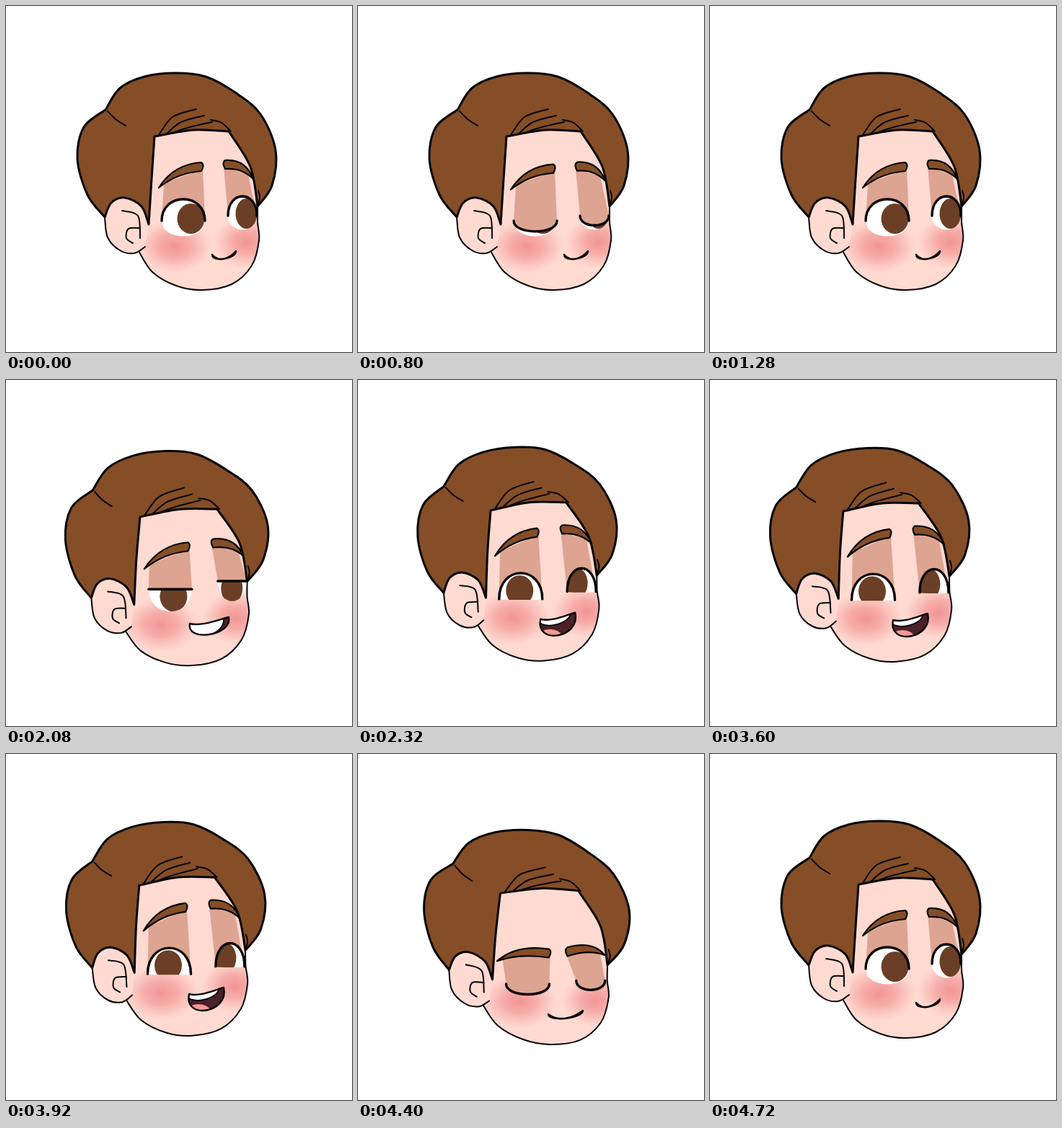
These frames come from a looping animation (480 px wide and 480 px high, 4800 ms). An HTML page with a canvas:

```html
<!DOCTYPE html>
<html lang="en">
<head>
<meta charset="utf-8">
<title>Head turn</title>
<style>
html, body { margin: 0; width: 100%; height: 100%; overflow: hidden; background: #fff; }
canvas { display: block; width: 480px; height: 480px; }
</style>
</head>
<body>
<canvas id="stage" width="480" height="480"></canvas>
<script>
const ctx = document.getElementById('stage').getContext('2d');
const LOOP = 4800, STEP = 80;
const INK = '#050404', SKIN = '#ffdad1', HAIR = '#854e27', IRIS = '#6a3f26', SHADE = '#dda491';

// One resting head; each outline is a smooth run through a few points, x and y in turn.
const HEAD = {
  lobe: [137, 293, 113, 262, 99, 212, 108, 168, 138, 144],
  crown: [138, 144, 158, 114, 192, 98, 235, 93, 277, 98, 318, 120, 353, 150, 374, 200, 369, 249, 349, 278],
  temple: [349, 278, 339, 223, 309, 174],
  fringe: [309, 174, 260, 172, 206, 181],
  sideburn: [206, 181, 202, 240, 198, 303],
  overEar: [198, 303, 188, 278, 165, 266, 146, 273, 137, 293],
  ear: [137, 293, 141, 321, 158, 339, 178, 343, 193, 334],
  jaw: [184, 340, 203, 369, 236, 388, 272, 394, 313, 386, 341, 360, 351, 325, 349, 300, 349, 278],
  cleft: [141, 146, 152, 157, 166, 166],
  lock: [284, 158, 299, 162, 312, 174],
  earFold: [161, 284, 183, 291, 186, 322],
  earCurl: [186, 308, 170, 309, 167, 322, 176, 329],
  edge: [350, 256, 352, 266, 349, 277]
};
const BROWS = [{ tip: [212, 252], end: [271, 217], side: 1 }, { tip: [343, 240], end: [304, 214], side: -1 }];
const EYES = [{ at: [246, 298], rx: 30, ry: 30, iris: 19, side: 1 }, { at: [328, 291], rx: 20, ry: 27, iris: 15, side: -1 }];

// warp: dx, dy of the four corners and of the middle bulge
// brow: dx, dy, inner drop; eye: dx, dy, lid height, lower height
// mouth: left corner, right corner, sag, opening, teeth depth
const glance = {
  warp: [0, 0, 0, 0, 0, 0, 0, 0, 0, 0], brow: [0, 0, 0],
  eye: [0, 0, 1, .72], look: [8, -3], mouth: [286, 345, 319, 340, 11, 0, 0]
};
const smirk = {
  warp: [-17, 9, -10, 2, -16, 9, -13, -2, -7, 4], brow: [1, 1, 0],
  eye: [2, -15, 0, 1.03], look: [2, 10], mouth: [255, 338, 309, 329, 4, 22, 26]
};
const laugh = {
  warp: [-17, 7, -16, -4, -13, 5, -14, -8, -7, -1], brow: [0, -6, -2],
  eye: [1, 9, 1.2, .04], look: [-4, -12], mouth: [254, 333, 302, 324, 4, 32, 14]
};
const dip = {
  warp: [-5, 7, 5, 18, -11, 2, -3, 13, -7, 3], brow: [-3, 15, 24],
  eye: [0, 9, -.48, .48], look: [3, 4], mouth: [264, 361, 312, 356, 11, 0, 0]
};

// time, pose, offset x, offset y
const KEYS = [
  [0, glance, 0, 0], [1840, glance, 0, 0], [1920, dip, 5, 5], [2080, smirk, 0, 0],
  [2160, laugh, -6, -10], [2240, laugh, -3, -5], [2400, laugh, 0, 0],
  [4240, laugh, 0, 0], [4400, dip, 0, 0], [4640, glance, 0, 0], [LOOP, glance, 0, 0]
];
const BLINKS = [[640, 1120], [3600, 3920]];

let pose, blink;
const lerp = (a, b, k) => a + (b - a) * k;
const mix = (a, b, k) => a.map((v, i) => lerp(v, b[i], k));

function setTime(t) {
  const i = KEYS.findIndex(key => key[0] > t);
  const [t0, a, ...from] = KEYS[i - 1], [t1, b, ...to] = KEYS[i];
  const k = 1 - (1 - (t - t0) / (t1 - t0)) ** 2;
  pose = { shift: mix(from, to, k) };
  for (const part in a) pose[part] = mix(a[part], b[part], k);
  blink = 0;
  for (const [on, off] of BLINKS) {
    if (t > on && t < off) blink = Math.sin(Math.PI * (t - on) / (off - on));
  }
}

function warp([x, y]) {
  const u = (x - 99) / 275, v = (y - 92) / 302, w = pose.warp;
  const bulge = 16 * u * (1 - u) * v * (1 - v);
  const move = i => lerp(lerp(w[i], w[i + 2], u), lerp(w[i + 4], w[i + 6], u), v) + w[i + 8] * bulge;
  return [x + move(0), y + move(1)];
}

// Smooth curves through the warped points, joined with corners between the runs.
function trace(...runs) {
  const path = new Path2D();
  runs.forEach((flat, r) => {
    const p = [];
    for (let i = 0; i < flat.length; i += 2) p.push(warp([flat[i], flat[i + 1]]));
    if (!r) path.moveTo(...p[0]);
    const slope = i => {
      const a = p[Math.max(i - 1, 0)], b = p[Math.min(i + 1, p.length - 1)];
      return [(b[0] - a[0]) / 6, (b[1] - a[1]) / 6];
    };
    for (let i = 1; i < p.length; i++) {
      const [ax, ay] = slope(i - 1), [bx, by] = slope(i);
      path.bezierCurveTo(p[i - 1][0] + ax, p[i - 1][1] + ay, p[i][0] - bx, p[i][1] - by, ...p[i]);
    }
  });
  return path;
}

function fill(path, color) { ctx.fillStyle = color; ctx.fill(path); }

function stroke(path, width) { ctx.lineWidth = width; ctx.strokeStyle = INK; ctx.stroke(path); }

function clipped(path, draw) {
  ctx.save();
  ctx.clip(path);
  draw();
  ctx.restore();
}

function oval(x, y, rx, ry, color) {
  const path = new Path2D();
  path.ellipse(x, y, rx, ry, 0, 0, Math.PI * 2);
  fill(path, color);
}

function blush(at, rx, ry) {
  ctx.save();
  ctx.translate(...warp(at));
  ctx.scale(rx, ry);
  const glow = ctx.createRadialGradient(0, 0, 0, 0, 0, 1);
  glow.addColorStop(0, 'rgba(234,112,118,.66)');
  glow.addColorStop(.45, 'rgba(236,120,124,.46)');
  glow.addColorStop(1, 'rgba(240,140,140,0)');
  ctx.fillStyle = glow;
  ctx.fillRect(-1, -1, 2, 2);
  ctx.restore();
}

function drawFace() {
  const jaw = trace(HEAD.jaw), skin = new Path2D(jaw);
  for (const corner of [[362, 205], [309, 168], [198, 178]]) skin.lineTo(...warp(corner));
  fill(skin, SKIN);
  clipped(skin, () => {
    blush([234, 333], 52, 37);
    blush([334, 328], 46, 36);
  });
  stroke(jaw, 2);
  const ear = trace(HEAD.overEar, HEAD.ear);
  fill(ear, SKIN);
  stroke(ear, 2);
}

function browEnds({ tip, end, side }) {
  const [dx, dy, drop] = pose.brow, [tx, ty] = warp(tip), [ex, ey] = warp(end);
  const low = dy + blink * 3;
  return [tx + dx - drop * side * .2, ty + low + drop * .35, ex + dx + drop * side * .2, ey + low + drop];
}

function drawBrow(brow) {
  const [tx, ty, ex, ey] = browEnds(brow), s = brow.side;
  const mx = (tx + ex) / 2 - 9 * s, my = (ty + ey) / 2;
  const path = new Path2D();
  path.moveTo(tx, ty);
  path.quadraticCurveTo(mx, my - 15, ex, ey);
  path.quadraticCurveTo(ex + 5 * s, ey + 3, ex, ey + 12);
  path.quadraticCurveTo(mx + 5 * s, my - 3, tx, ty);
  path.closePath();
  fill(path, HAIR);
  stroke(path, 2.2);
}

function drawEye({ at, rx, ry, iris, side }, brow) {
  const [dx, dy, up, down] = pose.eye, [wx, wy] = warp(at);
  const x = wx + dx, y = wy + dy, lidHeight = lerp(up, -down, blink) * ry;
  const arc = (path, dir, h) => path.bezierCurveTo(x - rx * dir, y - h * 4 / 3, x + rx * dir, y - h * 4 / 3, x + rx * dir, y);
  const lid = new Path2D();
  lid.moveTo(x - rx, y);
  arc(lid, 1, lidHeight);
  const ball = new Path2D(lid);
  arc(ball, -1, -down * ry);
  clipped(ball, () => {
    fill(ball, '#fff');
    oval(x + pose.look[0] + 2.5 * side, y + pose.look[1], iris, 21, IRIS);
  });
  const [tx, ty, ex, ey] = browEnds(brow), shade = new Path2D(lid);
  const inner = [ex + 2 * side, ey + 9], outer = [tx + 7 * side, ty - 6];
  const [right, left] = side > 0 ? [inner, outer] : [outer, inner];
  shade.lineTo(...right);
  shade.lineTo(...left);
  fill(shade, SHADE);
  stroke(lid, 3.4);
}

function drawMouth() {
  const [lx, ly, rx, ry, sag, open, bite] = pose.mouth;
  const shape = depth => {
    const path = new Path2D(), reach = depth * .25;
    path.moveTo(lx, ly);
    path.bezierCurveTo(lerp(lx, rx, .3), ly + sag, lerp(lx, rx, .7), ry + sag, rx, ry);
    path.bezierCurveTo(rx + reach, ry + sag + depth, lx - reach, ly + sag + depth, lx, ly);
    return path;
  };
  const lips = shape(open);
  clipped(lips, () => {
    fill(lips, '#4b2029');
    oval(lerp(lx, rx, .27), ly + open * .72, 16, 9, '#f29a92');
    ctx.translate(lx - 2, ly - 1);
    ctx.scale(.9, 1);
    ctx.translate(-lx, -ly);
    const teeth = shape(bite);
    fill(teeth, '#fff');
    stroke(teeth, 1.8);
  });
  stroke(lips, 2.4);
}

function drawHair() {
  const { lobe, crown, temple, fringe, sideburn, overEar } = HEAD;
  const hair = trace(lobe, crown, temple, fringe, sideburn, overEar);
  hair.closePath();
  fill(hair, HAIR);
  stroke(hair, 3);
  for (const name of ['cleft', 'lock', 'earFold', 'earCurl', 'edge']) stroke(trace(HEAD[name]), 2);
  for (let i = 0; i < 3; i++) {
    stroke(trace([212 + 11 * i, 179 - 2 * i, 231 + 12 * i, 154 + 7 * i, 264 + 11 * i, 143 + 9 * i]), 2);
  }
}

function draw(t) {
  setTime(t);
  ctx.setTransform(1, 0, 0, 1, 0, 0);
  ctx.fillStyle = '#fff';
  ctx.fillRect(0, 0, 480, 480);
  ctx.translate(...pose.shift);
  ctx.lineCap = ctx.lineJoin = 'round';
  drawFace();
  EYES.forEach((eye, i) => drawEye(eye, BROWS[i]));
  drawMouth();
  drawHair();
  BROWS.forEach(drawBrow);
}

const start = performance.now();
function tick() {
  const t = (performance.now() - start) % LOOP;
  draw(Math.floor(t / STEP) * STEP);
  requestAnimationFrame(tick);
}
tick();
</script>
</body>
</html>
```
